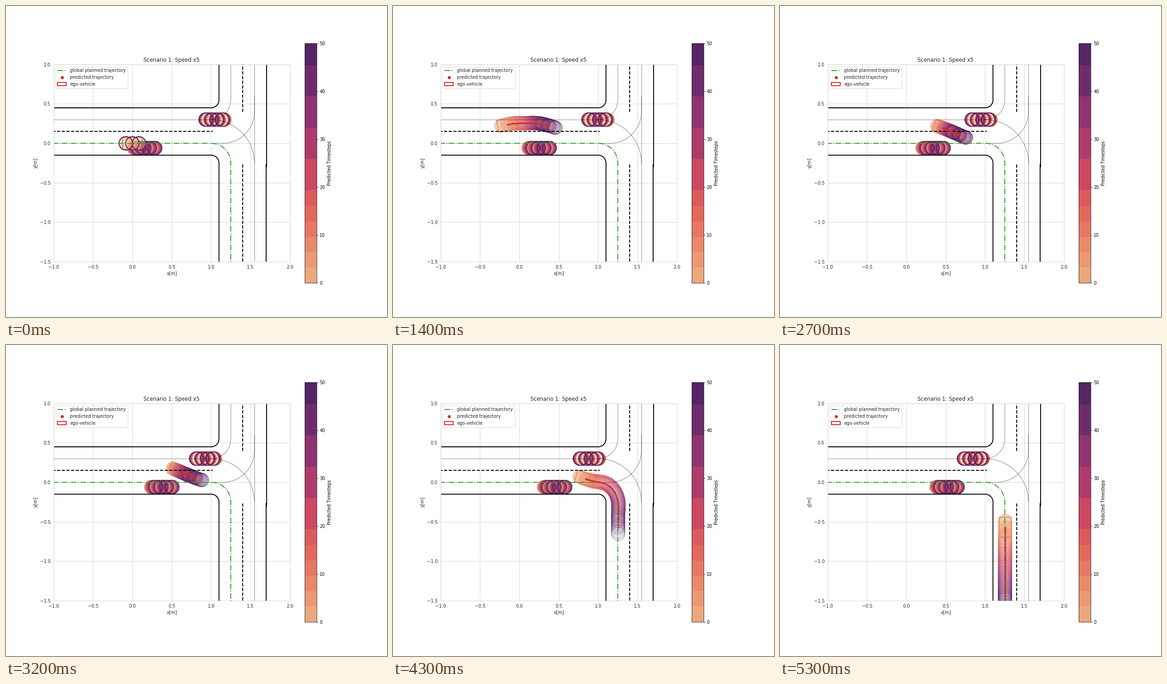
These frames come from a looping animation (829 px wide and 675 px high, 5400 ms). A matplotlib script:

```python
import numpy as np
import matplotlib.pyplot as plt
from matplotlib.animation import FuncAnimation
from matplotlib.cm import ScalarMappable
from matplotlib.collections import PolyCollection
from matplotlib.colors import BoundaryNorm, LinearSegmentedColormap, ListedColormap
from matplotlib.lines import Line2D
from matplotlib.patches import Polygon, Rectangle

W, H, DPI = 829, 675, 64
S = W / 12 / DPI  # point sizes as on a 12 inch wide figure
FRAMES, INTERVAL = 54, 100
RED, GREEN, GREY, DARK = "tab:red", "tab:green", "0.8", "0.15"

plt.rcParams["font.family"] = "DejaVu Sans"
for key in ("font.size", "axes.titlepad", "axes.labelpad", "axes.linewidth",
            "grid.linewidth", "lines.markersize",
            "xtick.major.pad", "xtick.major.size", "xtick.major.width",
            "ytick.major.pad", "ytick.major.size", "ytick.major.width"):
    plt.rcParams[key] *= S

flare = LinearSegmentedColormap.from_list("warm", [
    "#edb081", "#e98d6b", "#e3685c", "#d14a61",
    "#b13c6c", "#8f3371", "#6c2b6d", "#4b2362"])

# Prediction horizon: 50 steps, five per animation frame
HORIZON = np.linspace(0, 10, 51)
STEP_COLORS = flare(HORIZON / 10)


def arc(cx, cy, rx, start, end, ry=None):
    a = np.radians(np.linspace(start, end, 56))
    return np.column_stack([cx + rx * np.cos(a), cy + (ry or rx) * np.sin(a)])


def path(*parts):
    return np.vstack([np.atleast_2d(p) for p in parts])


def smoothstep(x, start, end):
    u = np.clip((x - start) / (end - start), 0, 1)
    return u * u * (3 - 2 * u)


CIRCLE = arc(0, 0, 1, 0, 360)

# Ego route: out to overtake, back into the lane, right turn, straight down
EGO_LENGTH, EGO_WIDTH, EGO_RADIUS = 0.25, 0.15, 0.0858
EGO_OFFSETS = np.array([-1, 0, 1]) * EGO_LENGTH / 3
x_lane = np.linspace(-1, 1, 400)
y_lane = 0.255 * (smoothstep(x_lane, -1, 0) - smoothstep(x_lane, 0.17, 1.08))
ROUTE = path(np.column_stack([x_lane, y_lane]),
             arc(1.0, -0.3, 0.255, 89, 0, ry=0.3), (1.25, -2.5))
ROUTE_S = np.append(0, np.cumsum(np.hypot(*np.diff(ROUTE, axis=0).T)))

# Ego speed: pull away, cruise, brake behind the car, accelerate out of the turn
TIME = np.linspace(1, FRAMES + 12, 1301)
SPEED = np.interp(TIME, [1, 4, 17, 21, 36, 43, 47],
                  [0.03, 0.073, 0.073, 0.036, 0.018, 0.036, 0.1])
TRAVEL = np.append(0, np.cumsum((SPEED[1:] + SPEED[:-1]) / 2 * np.diff(TIME)))

# Other cars: start x, y, speed per frame
CARS = [(1.0685, 0.3, -0.00374), (0.1218, -0.06, 0.0068)]
CAR_OFFSETS = np.linspace(-0.1025, 0.1025, 4)
CAR_RADIUS = 0.087


def on_route(s):
    return np.column_stack([np.interp(s, ROUTE_S, c) for c in ROUTE.T])


def ego_plan(frame):
    """Predicted centres and unit headings; the car waits at the origin first."""
    if frame == 0:
        return np.zeros((51, 2)), np.tile((1.0, 0.0), (51, 1))
    s = np.interp(frame + HORIZON, TIME, TRAVEL)
    heading = on_route(s + 0.01) - on_route(s - 0.01)
    return on_route(s), heading / np.linalg.norm(heading, axis=1)[:, None]


def rings(centres, radius):
    return centres.reshape(-1, 1, 2) + radius * CIRCLE


def car_rings(car, frame):
    x, y, speed = car
    xs = x + speed * (frame + HORIZON)[:, None] + CAR_OFFSETS
    return rings(np.stack([xs, np.full_like(xs, y)], axis=-1), CAR_RADIUS)


fig, ax = plt.subplots(figsize=(W / DPI, H / DPI), dpi=DPI, facecolor="white")
ax.set_aspect("equal")
ax.set(xlim=(-1, 2), ylim=(-1.5, 1),
       xticks=np.arange(-1, 2.1, 0.5), yticks=np.arange(-1.5, 1.1, 0.5))
ax.set_title("Scenario 1: Speed x5", color=DARK)
ax.set_xlabel("x[m]", color=DARK)
ax.set_ylabel("y[m]", color=DARK)
ax.tick_params(left=False, bottom=False, labelcolor=DARK)
ax.set_axisbelow(True)
ax.grid(color=GREY)
for spine in ax.spines.values():
    spine.set_edgecolor(GREY)


def draw(points, width, style="-", color="black"):
    ax.plot(*np.asarray(points, float).T, style, color=color, lw=width * S)


# Road edges
draw(path((-1, 0.45), arc(1.0, 0.55, 0.1, -90, 0), (1.1, 1)), 2)
draw([(-1, 0.45), (0, 0.45)], 2)
draw(path((-1, -0.15), arc(1.0, -0.25, 0.1, 90, 0), (1.1, -1.5)), 2)
draw([(1.703, 1), (1.703, -0.3)], 2)
draw([(1.7, -0.27), (1.7, -1.5)], 2)

# Centre lines
draw([(-2, 0.15), (1.02, 0.15)], 2, "--")
draw([(1.4, 0.4), (1.4, 1)], 2, "--")
draw([(1.4, -0.27), (1.4, -1.5)], 2, "--")

# Lane paths through the junction
draw([(-1, 0.3), (1.0, 0.3)], 0.5)
draw([(1.55, 1), (1.55, -1.5)], 0.5)
draw(arc(1.0, -0.25, 0.55, 90, 0), 0.5)
draw(path(arc(1.0, 0.55, 0.25, -90, 0), (1.25, 1)), 0.5)
draw(path((1.0, 0), arc(1.15, 0.4, 0.4, -90, 0), (1.55, 0.6)), 0.5)

draw(path((-2, 0), arc(1.0, -0.25, 0.25, 90, 0), (1.25, -1.5)), 2, "-.", GREEN)


def add_trail(verts, circles):
    """One ring per circle and step; only the current pose is filled."""
    edge = np.repeat(STEP_COLORS, circles, axis=0)
    edge[:, 3] = 0.5
    face = edge.copy()
    face[circles:, 3] = 0
    trail = PolyCollection(verts, facecolors=face, edgecolors=edge,
                           linewidths=S, zorder=1)
    ax.add_collection(trail, autolim=False)
    return trail


# Moving artists
car_trails = [add_trail(car_rings(car, 0), len(CAR_OFFSETS)) for car in CARS]
ego_box = Polygon(np.zeros((4, 2)), fill=False, lw=1.6 * S, zorder=1)
ax.add_patch(ego_box)
ego_trail = add_trail(rings(np.zeros((51, 3, 2)), EGO_RADIUS), len(EGO_OFFSETS))
plan_dots, = ax.plot([], [], "o", color=RED, ms=3.6 * S, mew=0, zorder=3)

ax.legend(handles=[
    Line2D([], [], color=GREEN, ls="-.", lw=2 * S, label="global planned trajectory"),
    Line2D([], [], color=RED, marker="o", ls="", label="predicted trajectory"),
    Rectangle((0, 0), 1, 1, fill=False, ec=RED, lw=2 * S, label="ego-vehicle"),
], loc="upper left", edgecolor=GREY, labelcolor=DARK)

# Colour scale in steps: narrow light bands, then wide dark ones
edges = np.append(np.r_[0:19:3.2, 19.4:50:6.5], 50)
bands = ListedColormap(flare((edges[:-1] + edges[1:]) / 100))
bar = fig.colorbar(ScalarMappable(BoundaryNorm(edges, bands.N), bands), ax=ax,
                   spacing="proportional", ticks=range(0, 51, 10))
bar.minorticks_off()
bar.set_label("Predicted Timesteps")


def update(frame):
    for car, trail in zip(CARS, car_trails):
        trail.set_verts(car_rings(car, frame))

    centres, heading = ego_plan(frame)
    body = centres[:, None] + EGO_OFFSETS[:, None] * heading[:, None]
    ego_trail.set_verts(rings(body, EGO_RADIUS))

    along = heading[0] * EGO_LENGTH / 2
    across = np.array([-heading[0, 1], heading[0, 0]]) * EGO_WIDTH / 2
    ego_box.set_xy([centres[0] + i * along + j * across
                    for i, j in ((-1, -1), (1, -1), (1, 1), (-1, 1))])
    ego_box.set_edgecolor(STEP_COLORS[-1] if frame == 0 else RED)
    plan_dots.set_data(*centres.T)
    return [*car_trails, ego_box, ego_trail, plan_dots]


anim = FuncAnimation(fig, update, frames=FRAMES, interval=INTERVAL,
                     repeat=True, repeat_delay=0, blit=False)
plt.show()
```
